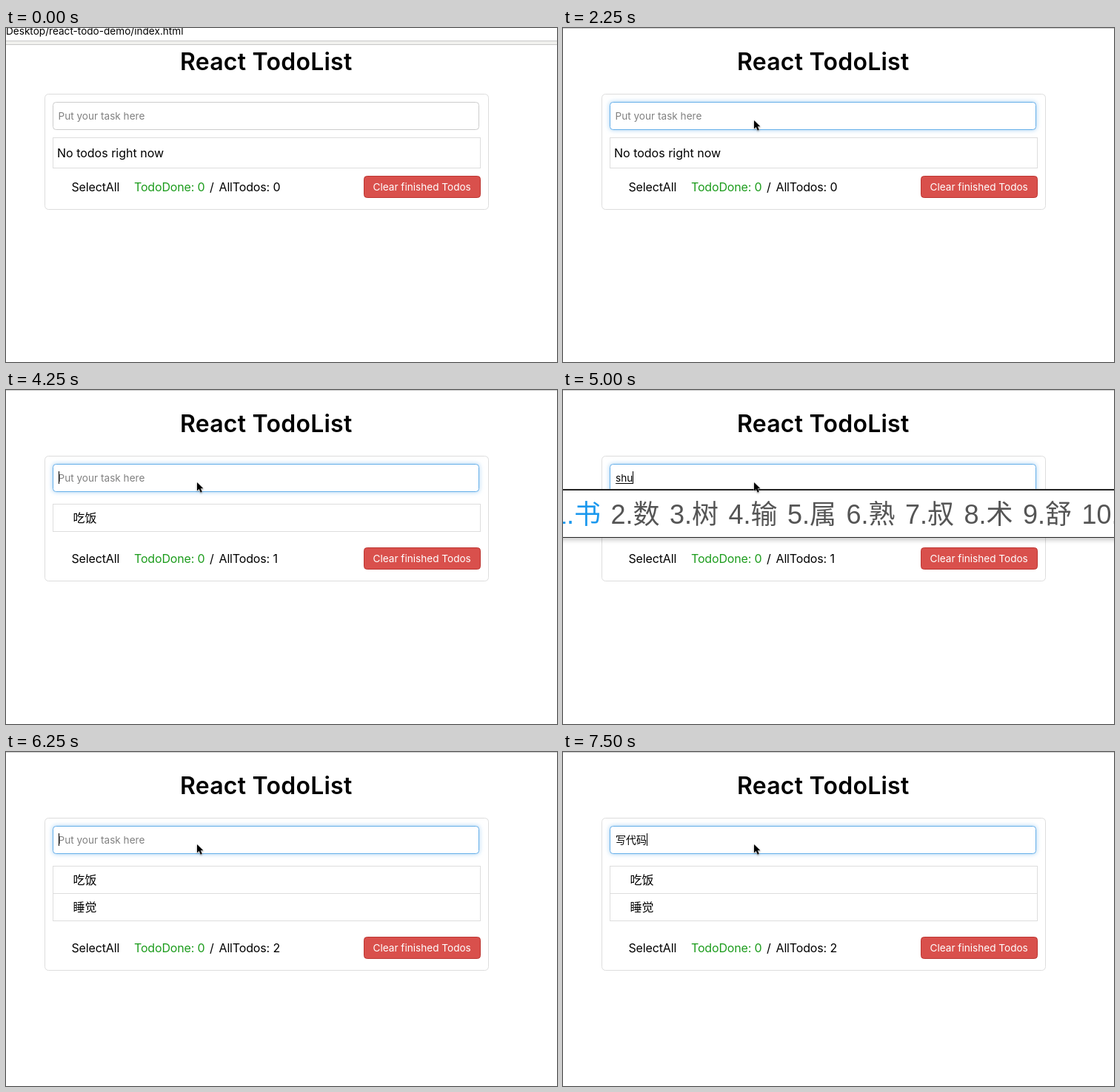
An HTML page that plays this animation: 744 px wide and 452 px high, repeating every 8000 ms.

```html
<!DOCTYPE html>
<html lang="zh-CN">
<head>
<meta charset="utf-8">
<title>React TodoList</title>
<style>
  html, body { margin: 0; width: 744px; height: 452px; overflow: hidden; background: #fff; }
  svg { display: block; }
  text { font: 16px Inter, 'Noto Sans CJK SC', 'Noto Sans CJK', sans-serif; white-space: pre; }
  .title { font-size: 32px; font-weight: 600; letter-spacing: .25px; }
  .small { font-size: 13.6px; }
  .typed { font-size: 14px; }
  .tight { letter-spacing: -.15px; }
  .ime { font: 300 36px 'Liberation Sans', 'Noto Sans CJK SC', 'Noto Sans CJK', sans-serif; }
  .kaomoji { font: 36px 'DejaVu Sans', sans-serif; direction: ltr; unicode-bidi: bidi-override; }
  .box { fill: #fff; stroke: #ddd; }
  .popup { filter: drop-shadow(0 3px 3px rgba(0, 0, 0, .22)); }
  .pointer { filter: drop-shadow(0 1px 1px rgba(0, 0, 0, .4)); }
</style>
</head>
<body>
<svg id="stage" width="744" height="452">
  <defs>
    <linearGradient id="bowl" x2="1">
      <stop stop-color="#aaa"/><stop offset=".4" stop-color="#ddd"/><stop offset="1" stop-color="#858585"/>
    </linearGradient>
    <linearGradient id="face" x2="0" y2="1">
      <stop stop-color="#ffe257"/><stop offset="1" stop-color="#f3a52c"/>
    </linearGradient>
  </defs>
  <g id="scene"></g>
</svg>
<script>
const scene = document.getElementById('scene');
const LOOP = 8000;

const start = { bar: false, pointer: null, focus: 0, caret: false, input: '', words: '', imeX: 0, todos: [] };
const compose = (input, imeX, words) => ({ input, imeX, words, caret: true });
const commit = input => ({ input, words: '', caret: true });
const add = (...todos) => ({ input: '', words: '', todos, caret: true });

// Each step keeps the state before it and changes only what it lists.
const steps = [
  [0, { bar: true }],
  [250, { bar: false, pointer: [330, 14] }],
  [500, { pointer: [296, 60] }],
  [750, { pointer: [268, 106] }],
  [1000, { pointer: [258, 125] }],
  [1500, { focus: .5 }],
  [1750, { focus: 1, caret: true }],
  [2250, { caret: false }],
  [2750, compose('c', -55, '从 才 出 次 成 吃 长 此 车 曾 处')],
  [3000, compose('chi', -55, '吃 持 尺 迟 池 赤 翅 齿 痴 驰 耻')],
  [3250, compose("chi'f", -55, '吃饭 rice 吃法 赤峰 smile chiffon 吃放')],
  [3500, compose("chi'fan", -55, '吃饭 rice 吃翻 池饭 迟饭 持反 尺翻')],
  [3750, commit('吃饭')],
  [4000, add('吃饭')],
  [4750, compose('s', -15, '是 说 三 上 时 岁 死 送 谁 算')],
  [5000, compose('shu', -15, '书 数 树 输 属 熟 叔 术 舒 鼠')],
  [5250, compose("shu'j", -15, '数据 书记 书籍 属鸡 熟记 书架 书脊')],
  [5500, compose("shuj'iiao", -15, '睡觉 sleep 书记 书籍 属鸡 熟记 书脊')],
  [5750, commit('睡觉')],
  [6000, add('吃饭', '睡觉')],
  [6500, compose('x', -15, '想 先 下 小 新 写 向 学 些 行')],
  [6750, compose('xie', -15, '写 些 谢 鞋 斜 携 歇 协 邪 卸')],
  [7000, compose("xie'dai", -15, '写代 鞋带 携带 斜带 谢代 写带 鞋袋')],
  [7250, compose("xie'dai'ma", -15, '写代码 鞋带 携带 写代 斜带 写 些')],
  [7500, commit('写代码')],
];

const text = (x, y, str, color = '#000', cls = '', extra = '') =>
  `<text x="${x}" y="${y}" fill="${color}" class="${cls}" ${extra}>${str}</text>`;
const box = (x, y, w, h, r = 0, extra = '') =>
  `<rect class="box" x="${x + .5}" y="${y + .5}" width="${w - 1}" height="${h - 1}" rx="${r}" ${extra}/>`;
const line = (y, color, h = 1) => `<rect y="${y}" width="744" height="${h}" fill="${color}"/>`;

// Candidates that are not plain Chinese: width and drawing
const special = {
  rice: [39, x => `<g transform="translate(${x} 0)">
    <path d="M2 165Q5 150 18 148 32 150 35 165z" fill="#e2e0db" stroke="#b5b2ac"/>
    <path d="M7 160l4-3m3 4l3-5m3 6l4-4m3 4l2-3M12 154l4-2m4 3l4-2" stroke="#a9a59d"/>
    <path d="M1 163Q18 169 36 163 35 175 26 180 18 183 11 180 2 175 1 163z" fill="url(#bowl)"/></g>`],
  sleep: [39, x => `<g transform="translate(${x} 0)" fill="none" stroke-linecap="round">
    <circle cx="17.5" cy="165.5" r="16" fill="url(#face)"/>
    <path d="M6 164q4 4 8 0M20 164q4 4 8 0" stroke="#714514" stroke-width="2"/>
    <ellipse cx="17" cy="174" rx="4" ry="3.5" fill="#714514"/>
    <path d="M18 152h4l-4 5h4M24 150h4l-4 5h4M30 148h4l-4 5h4" stroke="#2d62b5" stroke-width="1.6"/></g>`],
  smile: [111.5, x =>
    text([1, 11, 30].map(d => x + d).join(' '), 181, '١١(', '#555', 'kaomoji') +
    text([43, 61, 81].map(d => x + d).join(' '), 181, '❛ᴗ❛', '#555', 'kaomoji', 'stroke="#555" stroke-width="1.6"') +
    text(x + 98, 181, ')', '#555', 'kaomoji')],
  chiffon: [100],
};

function popup({ words, imeX }) {
  let x = imeX;
  const items = words.split(' ').map((word, i) => {
    const [width, draw] = special[word] || [36 * word.length];
    const label = text(x, 181, `${i + 1}.${draw ? '' : word}`, i ? '#555' : '#1a98ee', 'ime');
    const art = draw ? draw(x + 30) : '';
    x += 43.5 + width;
    return label + art;
  });
  return `<rect class="popup" x="-20" y="134" width="784" height="66" fill="#fff"/>
    ${line(134, '#222', 2)}${line(199, '#222')}${items.join('')}`;
}

function todoList(todos) {
  if (!todos.length) return box(63, 148, 578, 42) + text(69, 175, 'No todos right now');
  return todos.map((todo, i) =>
    box(63, 154 + 37 * i, 578, 38) + text(90.5, 179 + 37 * i, todo)).join('');
}

function footer(count) {
  const y = count ? 176 + 37 * count : 200;
  return text(88.5, y + 21, 'SelectAll', '#000', 'tight') +
    text(173, y + 21, 'TodoDone: 0', '#1c9c1c', 'tight') +
    text(275, y + 21, '/') + text(287.5, y + 21, `AllTodos: ${count}`, '#000', 'tight') +
    box(483, y, 158, 30, 4, 'style="fill:#d9504c;stroke:#bd3632"') +
    text(495.5, y + 20, 'Clear finished Todos', '#fff', 'small');
}

function inputBox({ focus, input, words }) {
  const style = focus
    ? `style="stroke:#66afe9;filter:drop-shadow(0 0 ${3 * focus}px rgba(102,175,233,${.6 * focus}))"`
    : 'style="stroke:#ccc"';
  const content = input
    ? text(71, 124, input, '#000', words ? 'small' : 'typed', 'id="typed"')
    : text(70.5, 124, 'Put your task here', '#808080', 'small');
  return box(63, 100, 576, 38, 4, style) + content;
}

const addressBar = () =>
  text(239.5, 9, 'Desktop/react-todo-demo/index.html', '#000', 'small', 'text-anchor="end"') +
  line(17, '#c8c8c8') + line(18, '#f1f1ee', 4) + line(22, '#c8c8c8');

const arrow = ([x, y]) => `<path class="pointer" transform="translate(${x} ${y}) scale(.88)"
  d="M0 0v13l3-3 2.5 5.5 2.2-1-2.4-5.2h4.2z" stroke="#fff" stroke-width=".8" paint-order="stroke"/>`;

function render(s) {
  const count = s.todos.length;
  scene.innerHTML = (s.bar ? addressBar() : line(0, '#ccc')) +
    text(235, 56.5, 'React TodoList', '#000', 'title') +
    box(52, 89, 600, count ? 133 + 37 * count : 157, 5) +
    inputBox(s) + todoList(s.todos) + footer(count);

  const typed = document.getElementById('typed');
  const width = typed ? Math.round(typed.getComputedTextLength()) : 0;
  let overlay = '';
  if (s.words) overlay += `<rect x="71" y="126" width="${width}" height="1"/>` + popup(s);
  if (s.caret) overlay += `<rect x="${71 + width}" y="110" width="1" height="17"/>`;
  if (s.pointer) overlay += arrow(s.pointer);
  scene.insertAdjacentHTML('beforeend', overlay);
}

let shown = 0;
function tick() {
  const t = performance.now() % LOOP;
  const past = steps.filter(([at]) => at <= t);
  if (past.length !== shown) {
    shown = past.length;
    render(Object.assign({}, start, ...past.map(([, change]) => change)));
  }
  requestAnimationFrame(tick);
}
tick();
</script>
</body>
</html>
```
